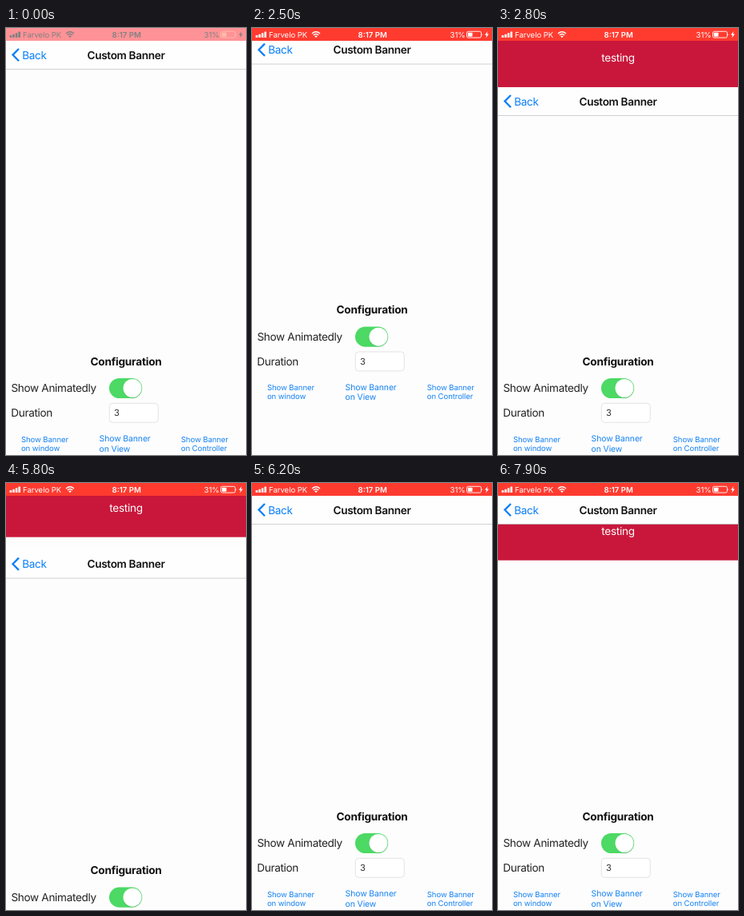
Recreate the animation shown at these times as an HTML page. Size 300 by 534 pixels, loop 8 s.

```html
<!DOCTYPE html>
<html lang="en">
<head>
<meta charset="utf-8">
<title>Custom Banner</title>
<style>
  html, body { margin: 0; width: 100%; height: 100%; overflow: hidden; background: #fefdfe; }
  svg { display: block; width: 100%; height: 100%; }
  text { font: 400 13.6px Inter, Roboto, sans-serif; letter-spacing: -.33px; fill: #222; text-rendering: geometricPrecision; }
  .mid { text-anchor: middle; }
  .title, .heading { font-weight: 600; fill: #111; }
  .heading { font-weight: 700; letter-spacing: -.2px; }
  .blue { fill: #0a7ffa; }
  .link text { font-size: 9.6px; letter-spacing: -.1px; fill: #1483f2; }
  .link.large text { font-size: 10.4px; }
  .input { font-size: 11.2px; fill: #333; }
  .banner rect { fill: #c9173b; }
  .banner text { fill: #fff; letter-spacing: -.28px; }
  #status text { font-size: 9.6px; letter-spacing: -.05px; fill: currentColor; }
  #status .clock { font-weight: 600; letter-spacing: 0; }
  .dark { color: #000; --battery: #ff7a50; }
  .light { color: #fff; --battery: #fff; }
</style>
</head>
<body>
<svg viewBox="0 0 300 534" preserveAspectRatio="none">
  <defs>
    <g id="status">
      <g fill="currentColor">
        <rect x="4.6" y="9" width="2.6" height="3" rx=".6"/>
        <rect x="8.2" y="7.8" width="2.6" height="4.2" rx=".6"/>
        <rect x="11.8" y="6.2" width="2.6" height="5.8" rx=".6"/>
        <rect x="15.4" y="4.4" width="2.6" height="7.6" rx=".6"/>
        <path d="M80 12.2L78.2 10.2Q80 8.8 81.8 10.2Z"/>
        <path d="M294.6 4L291 8.7h2.2L292.3 12.4L296 7.6h-2.3z"/>
      </g>
      <path d="M75 7Q80 2.6 85 7M76.8 9Q80 6.2 83.2 9" fill="none" stroke="currentColor" stroke-width="1.4"/>
      <g style="fill: var(--battery); stroke: var(--battery)">
        <rect x="268.5" y="4.3" width="18" height="7.8" rx="1.9" stroke-width=".9" fill="none"/>
        <rect x="269.9" y="5.7" width="5.6" height="5" rx=".6" stroke="none"/>
        <path d="M287.6 6.8q1.4 1.4 0 2.8z" stroke="none"/>
      </g>
      <text x="21" y="11.7">Farvelo PK</text>
      <text class="mid clock" x="150.7" y="11.7">8:17 PM</text>
      <text x="247.5" y="11.7">31%</text>
    </g>
  </defs>

  <rect width="300" height="534" fill="#fefdfe"/>

  <g id="content">
    <text class="mid heading" x="150" y="421.5">Configuration</text>
    <text x="6.4" y="455.3">Show Animatedly</text>
    <rect x="129" y="437.9" width="41.2" height="25.2" rx="12.6" fill="#4cd964"/>
    <circle cx="158" cy="451.2" r="11.7" fill="#000" opacity=".1"/>
    <circle cx="158" cy="450.5" r="11.5" fill="#fff"/>
    <text x="6.2" y="486.3">Duration</text>
    <rect x="129.3" y="469.3" width="61" height="24" rx="4" fill="#fff" stroke="#dcdcdc" stroke-width=".8"/>
    <text class="input" x="135" y="485.4">3</text>
    <g class="link">
      <text x="18.9" y="517.5">Show Banner</text>
      <text x="18.9" y="528.7">on window</text>
      <text x="218.8" y="517.5">Show Banner</text>
      <text x="218.8" y="528.7">on Controller</text>
    </g>
    <g class="link large">
      <text x="116.6" y="517.2">Show Banner</text>
      <text x="116.6" y="529.6">on View</text>
    </g>
  </g>

  <g id="viewBanner" class="banner">
    <rect width="300" height="58"/>
    <text class="mid" x="150" y="25.8">testing</text>
  </g>

  <g id="nav">
    <rect y="16" width="300" height="35" fill="#fefefe"/>
    <rect y="51" width="300" height=".8" fill="#c6c6ca"/>
    <path d="M16 26L8.5 33.6L16 41.2" fill="none" stroke="#0a7ffa" stroke-width="2.3"/>
    <text class="blue" x="20.2" y="38.7">Back</text>
    <text class="mid title" x="150" y="38.7">Custom Banner</text>
  </g>

  <g id="topBanner" class="banner">
    <rect width="300" height="74"/>
    <text class="mid" x="150" y="42">testing</text>
  </g>

  <rect width="300" height="16" fill="#ffecff"/>
  <use href="#status" class="dark"/>
  <g id="redBar">
    <rect width="300" height="16" fill="#ff3b30"/>
    <use href="#status" class="light"/>
  </g>
</svg>

<script>
  const LOOP = 8000, TICK = 100, SLIDE = 300;
  const BANNER = 58, STATUS = 16, FULL = BANNER + STATUS;
  const SHOW = 2432, HIDE = 5746, VIEW_SHOW = 7689;
  const $ = id => document.getElementById(id);
  const [content, nav, topBanner, viewBanner, redBar] =
    ['content', 'nav', 'topBanner', 'viewBanner', 'redBar'].map($);

  const clamp = x => Math.min(1, Math.max(0, x));
  const progress = (t, start) => {
    const x = clamp((t - start) / SLIDE);
    return x * x * (3 - 2 * x);
  };
  const moveY = (el, y) => el.setAttribute('transform', `translate(0 ${y.toFixed(2)})`);

  function draw(t) {
    let navY = 0, bodyY = 0, bannerY = -FULL;
    if (t >= HIDE) {
      const p = progress(t, HIDE);
      navY = bodyY = FULL * (1 - p);
      bannerY = -FULL * p;
    } else if (t >= SHOW) {
      bodyY = bannerY = -FULL * (1 - progress(t, SHOW));
      navY = BANNER + bodyY;
    }
    moveY(nav, navY);
    moveY(content, bodyY);
    moveY(topBanner, bannerY);
    moveY(viewBanner, -7 + BANNER * progress(t, VIEW_SHOW));
    viewBanner.setAttribute('visibility', t >= VIEW_SHOW ? 'visible' : 'hidden');

    // the status bar finishes fading to red
    const left = 1 - clamp(t / SLIDE);
    redBar.setAttribute('opacity', 1 - 0.5 * left * left);
  }

  const origin = performance.now();
  function frame(now) {
    const t = Math.max(0, now - origin) % LOOP;
    draw(Math.floor(t / TICK) * TICK);
    requestAnimationFrame(frame);
  }
  draw(0);
  requestAnimationFrame(frame);
</script>
</body>
</html>
```
